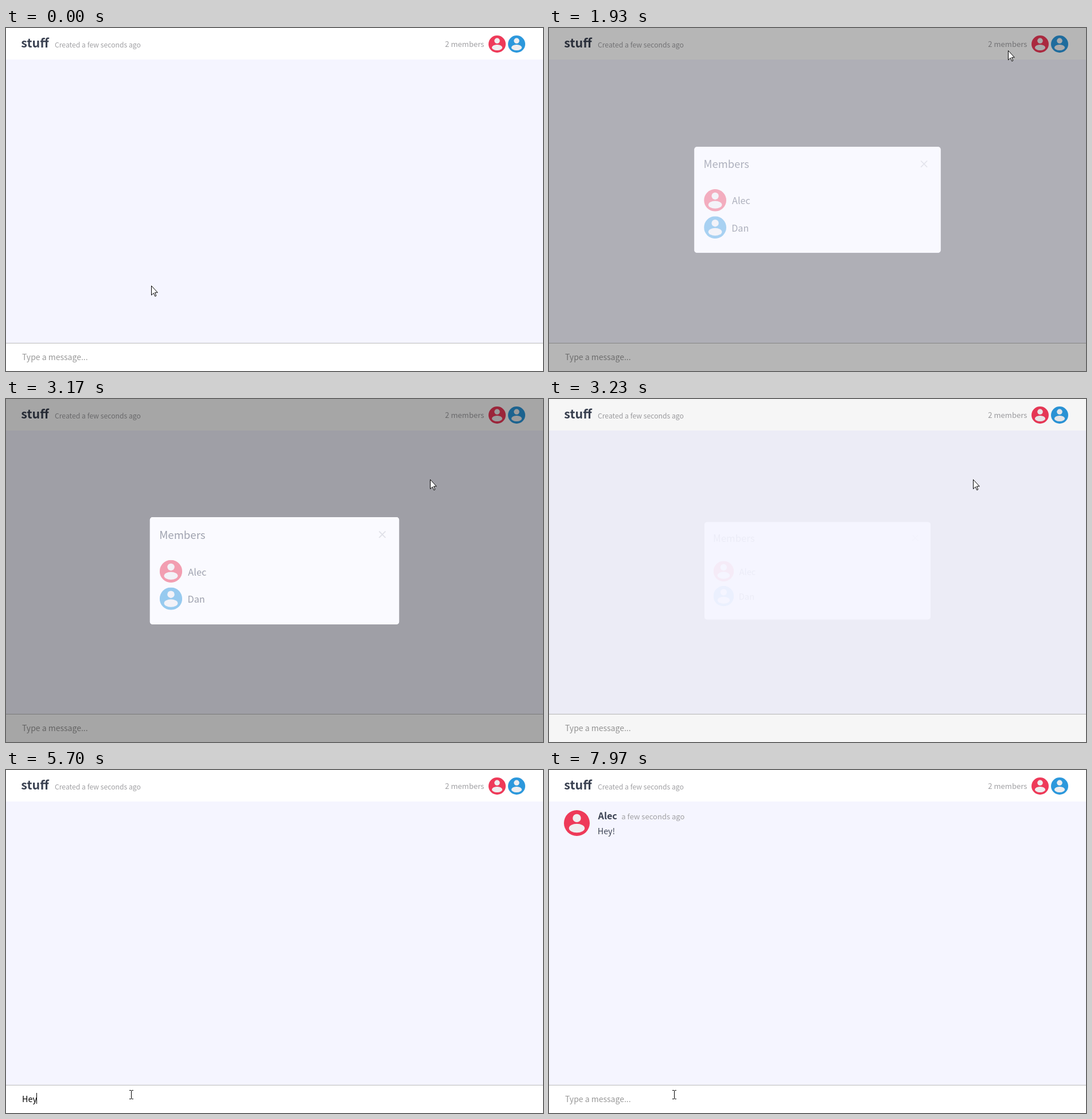
An HTML page that plays this animation: 936x598 px, repeating every 8 s.

```html
<!DOCTYPE html>
<html lang="en">
<head>
<meta charset="utf-8">
<title>Chat room</title>
<style>
  html, body { margin: 0; width: 100%; height: 100%; overflow: hidden; background: #fff; }
  svg { display: block; }
  #stage {
    width: 936px; height: 598px;
    font-family: "Noto Sans CJK JP", "Noto Sans CJK SC", "Noto Sans CJK", sans-serif;
    fill: #3b4252;
  }
  .muted { fill: #a1a1a4; }
  .bold { font-weight: 700; }
  .red { color: #ee3a59; }
  .blue { color: #2c98dc; }

  /* Every animation shares one 8 s clock: 1% = 80 ms. */
  .modal, .message, .arrow, .beam { animation: 8s linear infinite; }
  .caret, .hint, .typed tspan, .arrow path, .beam path { animation: 8s step-end infinite; }

  .modal { animation-name: modal; transform-origin: 468px 299.5px; opacity: 0; }
  @keyframes modal {
    0%, 22.85% { opacity: 0; transform: scale(.81); animation-timing-function: ease-in-out; }
    25.825% { opacity: 1; transform: scale(1); }
    38.44% { opacity: 1; transform: scale(1); animation-timing-function: ease-in-out; }
    40.75%, 100% { opacity: 0; transform: scale(.8); }
  }

  .message { animation-name: message; opacity: 0; }
  @keyframes message {
    0%, 92.6% { opacity: 0; animation-timing-function: ease; }
    95.375%, 100% { opacity: 1; }
  }

  .arrow { animation-name: arrow; }
  @keyframes arrow {
    0%, .875% { transform: translate(253px, 449px); }
    2.125% { transform: translate(236px, 437px); }
    3.75% { transform: translate(214px, 380px); }
    5.25% { transform: translate(208px, 300px); }
    6.75% { transform: translate(228px, 225px); }
    8% { transform: translate(280px, 176px); }
    9% { transform: translate(345px, 162px); }
    10.125% { transform: translate(455px, 184px); }
    11.25% { transform: translate(553px, 220px); }
    12.5% { transform: translate(622px, 212px); }
    14.125% { transform: translate(712px, 158px); }
    15.875% { transform: translate(772px, 92px); }
    17.5% { transform: translate(795px, 52px); }
    18.75%, 28.375% { transform: translate(800px, 39px); }
    29.125% { transform: translate(785px, 72px); }
    29.75% { transform: translate(756px, 120px); }
    30.375%, 38.25% { transform: translate(739px, 139px); }
    38.5%, 40.875% { transform: translate(739px, 140px); }
    41.875% { transform: translate(650px, 215px); }
    42.875% { transform: translate(470px, 385px); }
    43.75% { transform: translate(310px, 500px); }
    44.375%, 100% { transform: translate(240px, 548px); }
  }
  .arrow path { animation-name: arrow-off; }
  @keyframes arrow-off {
    0% { visibility: visible; }
    44.375%, 100% { visibility: hidden; }
  }

  .beam { animation-name: beam; }
  @keyframes beam {
    0%, 44.375% { transform: translate(213px, 553px); }
    45.25% { transform: translate(194px, 562px); }
    48.375%, 49.1% { transform: translate(190px, 562px); }
    49.125%, 53.75% { transform: translate(189px, 562px); }
    54.5% { transform: translate(191px, 563px); }
    55.875%, 100% { transform: translate(215px, 558px); }
  }
  .beam path { animation-name: beam-on; visibility: hidden; }
  @keyframes beam-on {
    0% { visibility: hidden; }
    44.375%, 100% { visibility: visible; }
  }

  .caret { animation-name: caret; opacity: 0; }
  @keyframes caret {
    0% { opacity: 0; transform: translateX(28px); }
    45% { opacity: 1; transform: translateX(28px); }
    51.625% { opacity: 0; transform: translateX(28px); }
    58.375% { opacity: 1; transform: translateX(28px); }
    64.625% { opacity: 0; transform: translateX(28px); }
    67.875% { opacity: 1; transform: translateX(38px); }
    70% { opacity: 1; transform: translateX(46px); }
    71.25% { opacity: 1; transform: translateX(53px); }
    76.625% { opacity: 1; transform: translateX(58px); }
    83.375% { opacity: 0; transform: translateX(58px); }
    90% { opacity: 1; transform: translateX(58px); }
    92.875% { opacity: 1; transform: translateX(28px); }
    99.625%, 100% { opacity: 0; transform: translateX(28px); }
  }

  .hint { animation-name: hint; fill: #999; }
  @keyframes hint {
    0% { visibility: visible; }
    67.875% { visibility: hidden; }
    92.875%, 100% { visibility: visible; }
  }

  .typed { fill: #000; }
  .typed tspan { visibility: hidden; }
  .typed tspan:nth-child(1) { animation-name: key1; }
  .typed tspan:nth-child(2) { animation-name: key2; }
  .typed tspan:nth-child(3) { animation-name: key3; }
  .typed tspan:nth-child(4) { animation-name: key4; }
  @keyframes key1 { 67.875% { visibility: visible; } 92.875% { visibility: hidden; } }
  @keyframes key2 { 70% { visibility: visible; } 92.875% { visibility: hidden; } }
  @keyframes key3 { 71.25% { visibility: visible; } 92.875% { visibility: hidden; } }
  @keyframes key4 { 76.625% { visibility: visible; } 92.875% { visibility: hidden; } }
</style>
</head>
<body>
<svg id="stage" viewBox="0 0 936 598">
  <defs>
    <symbol id="avatar" viewBox="0 0 44 44">
      <circle cx="22" cy="22" r="22" fill="currentColor"/>
      <g fill="#efeef0">
        <circle cx="22" cy="13.6" r="7"/>
        <ellipse cx="22" cy="30.8" rx="13.4" ry="7.5"/>
      </g>
    </symbol>
  </defs>

  <rect width="936" height="598" fill="#fff"/>
  <rect y="55" width="936" height="494" fill="#f5f5ff"/>
  <rect y="549" width="936" height="1" fill="#bbb"/>

  <!-- header -->
  <text class="bold" x="26.3" y="34" font-size="21.5">stuff</text>
  <text class="muted" x="85" y="34" font-size="12.2">Created a few seconds ago</text>
  <text class="muted" x="833.3" y="33" font-size="13.05" text-anchor="end">2 members</text>
  <use class="red" href="#avatar" x="841" y="13" width="30" height="30"/>
  <use class="blue" href="#avatar" x="875" y="13" width="30" height="30"/>

  <!-- first message -->
  <g class="message">
    <use class="red" href="#avatar" x="26" y="70" width="45" height="45"/>
    <text class="bold" x="85.6" y="86" font-size="16.1">Alec</text>
    <text class="muted" x="126.3" y="86" font-size="13.05">a few seconds ago</text>
    <text x="84.8" y="112" font-size="14.2">Hey!</text>
  </g>

  <!-- input -->
  <text class="hint" x="28" y="579" font-size="14">Type a message...</text>
  <text class="typed" x="28" y="579" font-size="14.3"><tspan>H</tspan><tspan>e</tspan><tspan>y</tspan><tspan>!</tspan></text>
  <rect class="caret" y="563" width="1" height="19" fill="#000"/>

  <!-- the dimming surrounds the card, so both fade and scale together -->
  <g class="modal">
    <path fill="#000" fill-opacity=".75" fill-rule="evenodd"
      d="M-400-400H1400V1000H-400ZM230 195H706a5 5 0 0 1 5 5V399a5 5 0 0 1-5 5H230a5 5 0 0 1-5-5V200a5 5 0 0 1 5-5Z"/>
    <rect x="225" y="195" width="486" height="209" rx="5" fill="#fff"/>
    <text x="243.4" y="237" font-size="20.8">Members</text>
    <path d="M672 222.500l12.500 12.500m0-12.500l-12.500 12.500" stroke="#c6c8cd" stroke-width="1.900"/>
    <use class="red" href="#avatar" x="244" y="278.500" width="44" height="44"/>
    <text x="299.400" y="308.500" font-size="18.300">Alec</text>
    <use class="blue" href="#avatar" x="244" y="332" width="44" height="44"/>
    <text x="298.400" y="362" font-size="18.300">Dan</text>
  </g>

  <!-- pointers -->
  <g class="arrow">
    <path d="M.5.5V16.800L4.300 13.200 6.800 18.800 8.900 17.900 6.500 12.200H11.300Z" fill="#fff" stroke="#000"/>
  </g>
  <g class="beam">
    <path d="M0 .5h3m1 0h3M3.500 1v14M0 15.500h3m1 0h3" fill="none" stroke="#000" shape-rendering="crispEdges"/>
  </g>
</svg>
</body>
</html>
```
